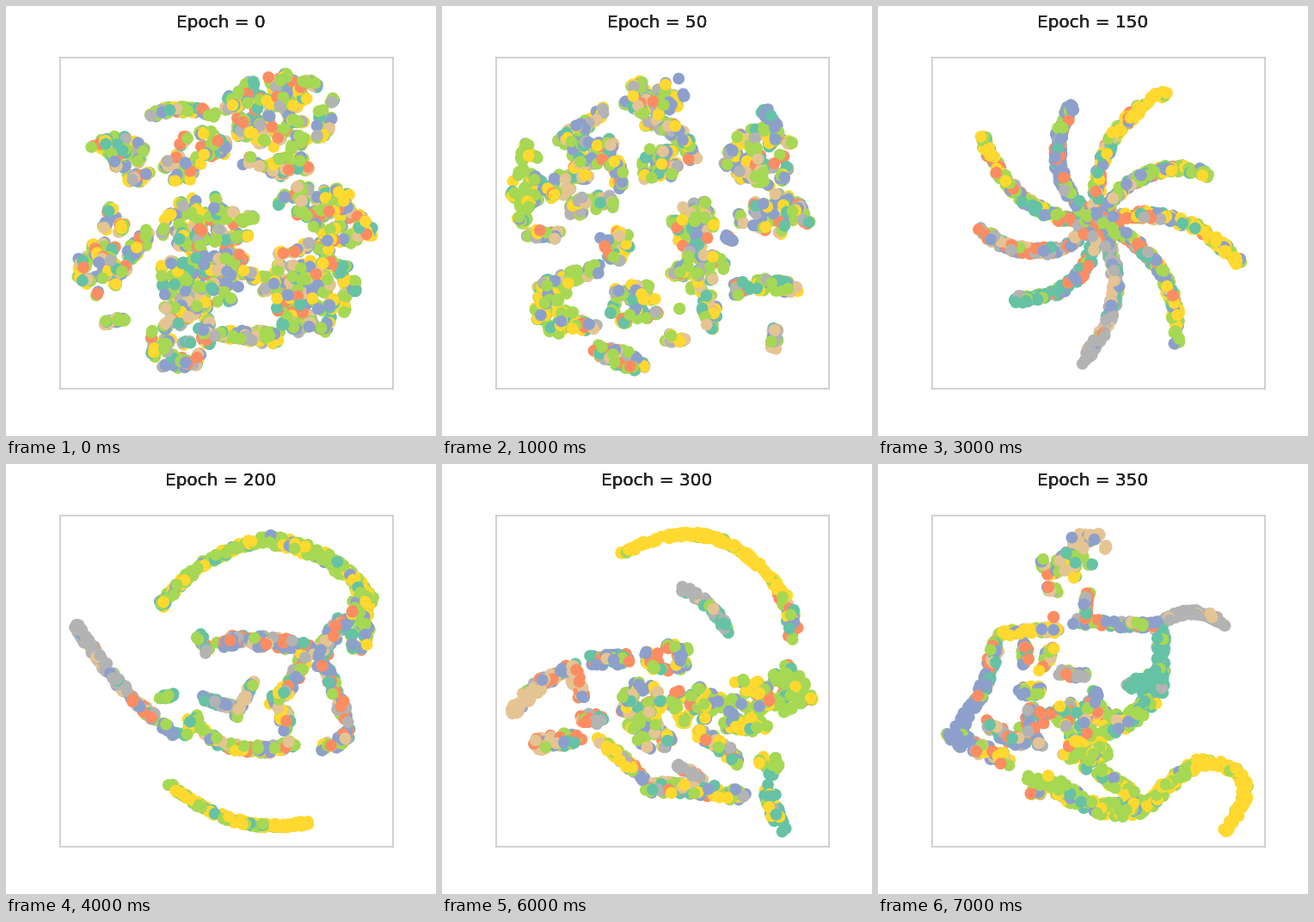
Write a matplotlib script that moves like this. It is 500 px wide and 500 px high and loops after 8000 ms.

```python
import numpy as np
import matplotlib.pyplot as plt
from matplotlib.animation import FuncAnimation

COLORS = dict(t="#66c2a5", o="#fc8d62", b="#8da0cb", g="#a6d854",
              y="#ffd92f", n="#e5c494", s="#b3b3b3")
# Letters weight the classes; "a>b" blends from mix a to mix b.
ALL = "ggggggggyyyybbbbtttnnnooss"
LIME = "ggggggyyytb"
GOLD = "yyyyyyyg"
COOL = "bbbgttnoso"
WARM = "nnoobbgst"
SEA = "ttttttgs"
STONE = "sssssssn"


class Cloud:
    """Dots strewn over blobs and along bent strokes, in stage pixels."""

    def __init__(self, seed):
        self.rng = np.random.default_rng(seed)
        self.spots, self.tints = [], []

    def disc(self, count):
        angle = self.rng.uniform(0, 2 * np.pi, count)
        reach = np.sqrt(self.rng.random(count))
        return np.c_[np.cos(angle), np.sin(angle)] * reach[:, None]

    def add(self, mix, spots, t):
        head, _, tail = mix.partition(">")
        for at in t:
            late = tail and self.rng.random() < at
            self.tints.append(COLORS[self.rng.choice(list(tail if late else head))])
        self.spots.append(spots)

    def blob(self, mix, x, y, rx, ry):
        count = int(0.15 * rx * ry) + 3
        clumps = self.disc(count // 4 + 2) * (rx, ry)
        pick = self.rng.integers(len(clumps), size=count)
        spots = (x, y) + clumps[pick] + 3 * self.disc(count)
        self.add(mix, spots, np.zeros(count))

    def arc(self, mix, width, x0, y0, x1, y1, bend=0):
        """Parabola from start to end; positive bend bulges to its left."""
        start, chord = np.array([x0, y0]), np.array([x1 - x0, y1 - y0])
        length = np.hypot(*chord)
        normal = np.array([chord[1], -chord[0]]) / length
        count = int((length + abs(bend)) * (0.5 + 0.065 * width)) + 3
        t = self.rng.random(count)
        bulge = 4 * bend * t * (1 - t)
        spots = start + np.outer(t, chord) + np.outer(bulge, normal)
        self.add(mix, spots + width * self.disc(count), t)

    def arms(self, count, twist, phase):
        """A hub with curved arms whose tips each favour one class."""
        tips = [GOLD, LIME, STONE, SEA, WARM, LIME, "bbbbbog"]
        for i in range(count):
            angle = phase + 2 * np.pi * i / count
            reach = self.rng.uniform(0.75, 1)
            x = 256 + 176 * reach * np.cos(angle)
            y = 252 + 175 * reach * np.sin(angle)
            self.arc(COOL + ">" + tips[i % len(tips)], 5, 256, 252, x, y, twist)

    def shuffled(self):
        spots = np.clip(np.vstack(self.spots), (80.1, 77.5), (432.4, 427.5))
        order = self.rng.permutation(len(spots))
        return spots[order], [self.tints[i] for i in order]


def epoch_0(c):
    c.arc(ALL, 4, 170, 126, 240, 126, 6)
    c.blob(ALL, 318, 123, 67, 42)
    c.blob(ALL, 320, 184, 43, 12)
    c.blob(ALL, 232, 160, 30, 15)
    c.blob(ALL, 130, 170, 37, 17)
    c.arc(ALL, 7, 138, 203, 165, 195)
    c.blob(ALL, 205, 188, 24, 17)
    c.blob(ALL, 125, 250, 14, 16)
    c.blob(ALL, 112, 306, 29, 30)
    c.arc(ALL, 8, 145, 290, 165, 265)
    c.blob(ALL, 232, 253, 56, 30)
    c.blob(ALL, 230, 322, 58, 48)
    c.blob(ALL, 202, 393, 38, 30)
    c.arc(ALL, 8, 240, 385, 315, 385)
    c.arc(ALL, 4, 115, 368, 138, 362)
    c.blob(ALL, 360, 227, 46, 20)
    c.blob(ALL, 392, 262, 34, 28)
    c.blob(ALL, 352, 328, 54, 53)


def epoch_50(c):
    c.blob(ALL, 249, 104, 38, 24)
    c.arc(ALL, 7, 238, 137, 292, 180, 14)
    c.blob(ALL, 252, 184, 25, 23)
    c.arc(ALL, 7, 137, 158, 192, 122)
    c.blob(ALL, 170, 178, 36, 28)
    c.arc(ALL, 6, 203, 180, 207, 212)
    c.blob(LIME, 97, 205, 16, 50)
    c.arc(ALL, 5, 98, 264, 138, 267)
    c.blob(ALL, 132, 205, 25, 18)
    c.blob(ALL, 176, 234, 32, 14)
    c.blob(ALL, 200, 278, 20, 21)
    c.arc(ALL, 7, 180, 305, 112, 328)
    c.blob(LIME, 135, 351, 26, 32)
    c.arc(ALL, 6, 150, 370, 178, 373)
    c.blob(ALL, 224, 347, 28, 24)
    c.arc(ALL, 10, 180, 400, 233, 418)
    c.blob(ALL, 292, 252, 24, 32)
    c.blob(ALL, 298, 307, 32, 24)
    c.blob(ALL, 313, 350, 11, 25)
    c.blob(ALL, 272, 389, 12, 9)
    c.arc("g", 0, 276, 352, 276.5, 352)
    c.blob(ALL, 371, 176, 42, 34)
    c.arc("sbsbt", 5, 375, 122, 388, 142)
    c.blob(ALL, 388, 243, 44, 24)
    c.arc("obg", 2, 330, 268, 339, 274)
    c.arc(ALL, 8, 341, 330, 410, 330, 5)
    c.arc("gbton>bns", 5, 386, 371, 386, 398)


def epoch_100(c):
    c.arc(LIME, 4, 200, 77, 133, 196, -20)
    c.arc(GOLD + ">" + COOL, 4, 170, 118, 215, 275, -4)
    c.arc(LIME, 3, 107, 136, 82, 182)
    c.arc(GOLD + ">" + COOL, 5, 230, 146, 280, 277, 7)
    c.arc(ALL, 6, 127, 220, 195, 290)
    c.arc(COOL, 8, 205, 268, 290, 300, -7)
    c.arc(ALL, 8, 290, 310, 365, 252, -8)
    c.blob(ALL, 320, 250, 16, 14)
    c.arc(WARM, 7, 373, 236, 413, 241)
    c.arc(ALL, 5, 430, 206, 352, 215, -7)
    c.arc(ALL, 5, 335, 235, 303, 180, -25)
    c.arc(ALL, 5, 292, 132, 348, 150)
    c.arc(ALL, 6, 350, 154, 364, 136)
    c.arc("ggynb", 3, 122, 328, 164, 342, -4)
    c.arc(COOL, 5, 135, 357, 250, 345, -17)
    c.arc(WARM, 4, 185, 389, 217, 374)
    c.arc(COOL + ">" + LIME, 5, 285, 340, 215, 427, 3)
    c.arc(ALL, 6, 262, 330, 271, 300)


def epoch_150(c):
    c.arms(9, 30, 0.3)


def epoch_200(c):
    c.arc(LIME, 4, 178, 167, 300, 88, 14)
    c.arc(LIME, 7, 300, 88, 423, 160, 18)
    c.blob(LIME + "oob", 411, 190, 15, 32)
    c.arc(COOL, 8, 395, 178, 367, 215)
    c.arc(ALL, 4, 225, 200, 235, 220)
    c.arc(WARM + "bbo", 7, 248, 207, 372, 220, 6)
    c.arc(STONE + ">" + COOL, 4, 82, 186, 200, 316, -10)
    c.arc("gtt", 3, 180, 272, 195, 268)
    c.blob("gggynt", 218, 304, 20, 11)
    c.arc(ALL, 5, 235, 318, 335, 325, -10)
    c.arc("ttsgnb", 4, 225, 271, 268, 284)
    c.arc("ntbgn", 3, 287, 253, 267, 293)
    c.arc(ALL, 6, 345, 222, 308, 275, 8)
    c.blob(ALL, 326, 295, 14, 16)
    c.arc(COOL, 6, 365, 230, 395, 300, 3)
    c.arc(ALL, 5, 400, 303, 368, 329, 8)
    c.arc("gggyt>yyyyyy", 3, 190, 371, 352, 417, -21)


def epoch_250(c):
    c.arms(7, -45, 1.1)


def epoch_300(c):
    c.arc(GOLD, 3, 209, 104, 395, 150, 43)
    c.arc("yyggtbno", 6, 394, 150, 408, 203, 4)
    c.arc(STONE + ">" + SEA, 4, 279, 144, 333, 194, 6)
    c.arc("bbobgtn", 7, 174, 228, 212, 227)
    c.blob("bbggtyo", 265, 226, 35, 15)
    c.arc("nnn>oobgtns", 6, 84, 287, 152, 235, 6)
    c.arc("nnnbo", 7, 151, 240, 164, 272)
    c.arc(COOL, 6, 158, 294, 182, 297)
    c.arc("nnnnno>bgot", 9, 110, 328, 155, 322, 4)
    c.arc("yyyn>gosb", 5, 185, 320, 235, 367)
    c.blob(ALL, 232, 282, 28, 28)
    c.blob(ALL, 245, 320, 22, 16)
    c.blob(LIME + "ob", 292, 282, 28, 21)
    c.blob(LIME + "ob", 352, 273, 35, 22)
    c.blob("gggggyto", 404, 262, 28, 28)
    c.arc(LIME, 8, 335, 302, 375, 306)
    c.arc(ALL, 6, 300, 313, 345, 350, 3)
    c.arc("s", 0, 335, 330, 335.5, 330)
    c.arc(ALL, 7, 237, 376, 350, 386, 3)
    c.arc("onss", 3, 271, 348, 304, 368)
    c.blob("tggty", 377, 352, 14, 11)
    c.arc("tyg>ttttts", 7, 378, 376, 394, 422)


def epoch_350(c):
    c.blob("nnnnb", 247, 92, 22, 13)
    c.blob(ALL, 217, 117, 33, 15)
    c.arc(ALL, 5, 195, 143, 208, 147)
    c.arc(COOL, 4, 243, 150, 240, 181)
    c.arc("o", 0, 204, 178, 204.5, 178)
    c.arc(COOL, 5, 230, 183, 332, 188)
    c.arc(STONE, 3, 325, 188, 406, 189, 16)
    c.arc(SEA, 6, 330, 197, 327, 268)
    c.blob(SEA, 307, 252, 18, 15)
    c.arc(LIME + "tt", 8, 318, 275, 258, 312, 5)
    c.arc("gyynb", 4, 140, 200, 208, 194, 4)
    c.arc("bgotn>bbbbb", 6, 138, 206, 90, 312, 7)
    c.blob("bbbbg", 95, 316, 14, 12)
    c.arc(ALL, 8, 108, 327, 152, 345)
    c.arc(COOL, 6, 126, 303, 165, 325)
    c.arc(COOL, 4, 170, 208, 172, 235)
    c.arc(ALL, 5, 190, 238, 201, 215)
    c.arc("bogs", 4, 213, 243, 243, 246)
    c.arc("bbgyt", 6, 166, 264, 190, 264)
    c.blob(COOL, 178, 310, 15, 26)
    c.blob(ALL + "oo", 240, 295, 42, 17)
    c.arc("tbgb", 4, 252, 265, 254, 285)
    c.blob(LIME + "on", 243, 333, 30, 25)
    c.arc(LIME, 7, 257, 358, 298, 385)
    c.blob(LIME + "ob", 187, 368, 16, 17)
    c.arc(LIME, 9, 205, 372, 320, 396, -16)
    c.arc(LIME, 6, 320, 390, 378, 346, 3)
    c.arc(GOLD, 4, 372, 344, 404, 425, 40)


SCENES = [epoch_0, epoch_50, epoch_100, epoch_150,
          epoch_200, epoch_250, epoch_300, epoch_350]


def layout(index):
    cloud = Cloud(index + 7)
    SCENES[index](cloud)
    return cloud.shuffled()


clouds = [layout(i) for i in range(len(SCENES))]

fig, ax = plt.subplots(figsize=(5, 5), dpi=100)
ax.set(xlim=(62.5, 450), ylim=(445, 60), xticks=[], yticks=[])
for spine in ax.spines.values():
    spine.set(color="0.8", linewidth=1.25)

dots = ax.scatter([], [], s=70, linewidths=1.5)
# Stacked copies give the heavy lettering.
titles = [fig.text(0.5, 0.98, "", ha="center", va="top", fontsize=14.4,
                   family="DejaVu Sans", color="0.15") for _ in range(4)]


def update(index):
    spots, tints = clouds[index]
    dots.set_offsets(spots)
    dots.set_facecolor(tints)
    dots.set_edgecolor(tints)
    for title in titles:
        title.set_text(f"Epoch = {50 * index}")
    return [dots, *titles]


anim = FuncAnimation(fig, update, frames=len(SCENES), interval=1000,
                     repeat=True, repeat_delay=0)
plt.show()
```
